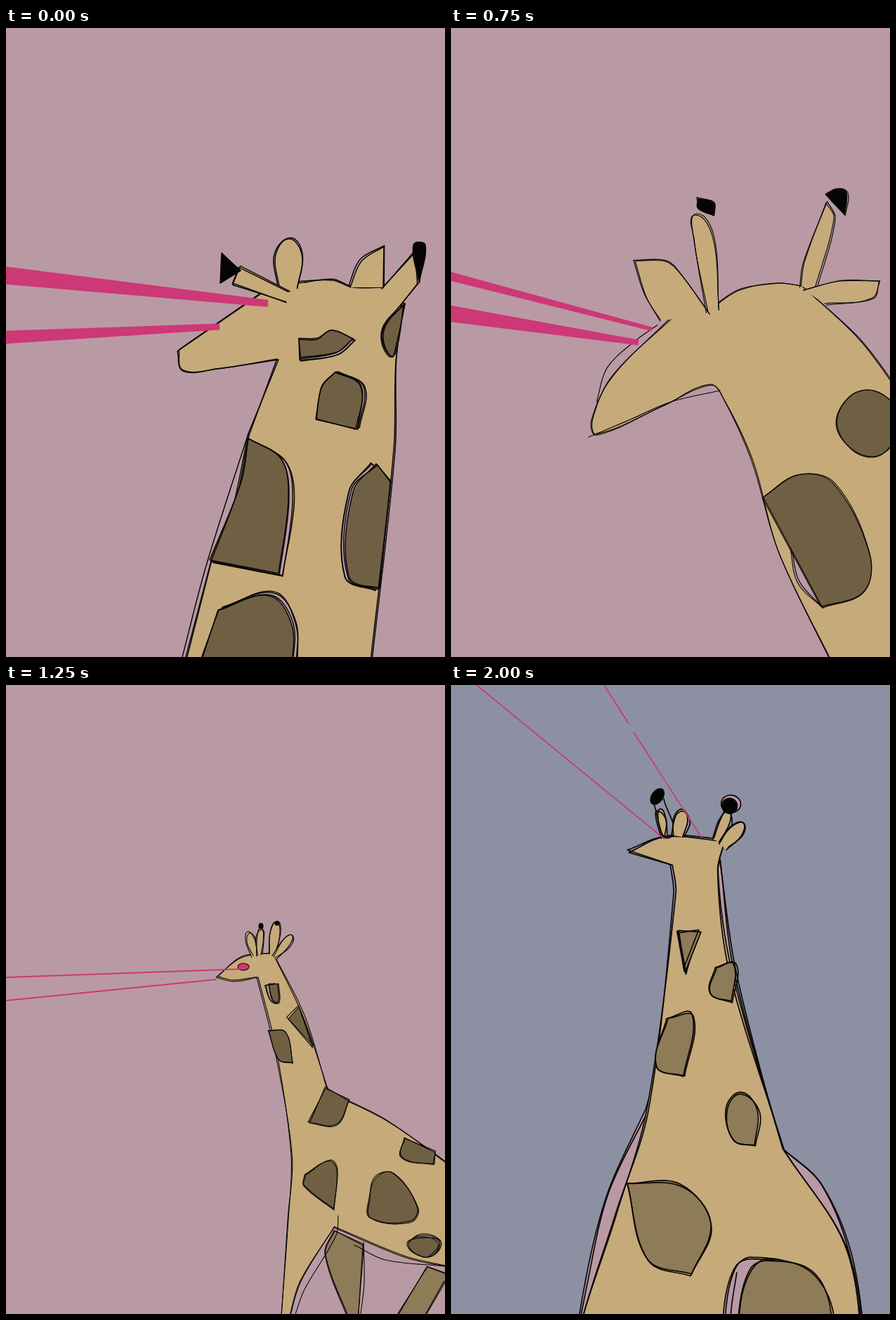
Recreate the animation shown at these times as an HTML page with a canvas. Size 625 px wide and 895 px high, loop 2250 ms.

```html
<!DOCTYPE html>
<html lang="en">
<head>
<meta charset="utf-8">
<title>Laser giraffe</title>
<style>
html, body { margin: 0; width: 100%; height: 100%; overflow: hidden; background: #b99aa4; }
canvas { display: block; }
</style>
</head>
<body>
<canvas id="stage" width="625" height="895"></canvas>
<script>
const ctx = document.getElementById('stage').getContext('2d');
const MAUVE = '#b99aa4', SLATE = '#8d90a3', TAN = '#c6aa7a', BROWN = '#706043',
      OLIVE = '#8e7b58', PINK = '#cd3877', BLACK = '#050505';

let seed;
const random = () => (seed = (seed * 16807) % 2147483647) / 2147483647;

// Smooth curve through "x,y" points; a trailing "!" makes a sharp corner.
function trace(text, closed, wobble = 0) {
  const pts = text.split(' ').flatMap(t => {
    const p = t.match(/-?[\d.]+/g).map(v => +v + (random() - 0.5) * wobble);
    return t.endsWith('!') ? [p, p] : [p];
  });
  const n = pts.length;
  const at = i => closed ? pts[(i + n) % n] : pts[Math.max(0, Math.min(n - 1, i))];
  const handle = (p, from, to, len) => {
    const dx = to[0] - from[0], dy = to[1] - from[1], k = len / (Math.hypot(dx, dy) || 1);
    return [p[0] + dx * k, p[1] + dy * k];
  };
  ctx.beginPath();
  ctx.moveTo(...pts[0]);
  for (let i = 0; i < (closed ? n : n - 1); i++) {
    const a = at(i - 1), b = at(i), c = at(i + 1), d = at(i + 2);
    const len = Math.hypot(c[0] - b[0], c[1] - b[1]) / 3;
    if (len) ctx.bezierCurveTo(...handle(b, a, c, len), ...handle(c, d, b, len), ...c);
  }
  if (closed) ctx.closePath();
}

function ink(path, closed, wobble) {
  trace(path, closed, wobble);
  ctx.stroke();
}

// A filled shape whose outline is gone over twice by hand.
function shape(color, path, closed) {
  trace(path, closed);
  ctx.fillStyle = color;
  ctx.fill();
  ctx.stroke();
  ink(path, closed, 5);
}

const skin = path => shape(TAN, path);
const tip = path => shape(BLACK, path, true);

// A spot; (dx, dy) is how far its bare outline slips out from under the colour.
const blotch = color => (path, dx = 0, dy = 0) => {
  ctx.save();
  ctx.translate(dx, dy);
  if (dx || dy) shape(MAUVE, path, true);
  ctx.restore();
  shape(color, path, true);
};
const spot = blotch(BROWN), patch = blotch(OLIVE);

// Returns at(t, side): the point a share t along a line, offset sideways.
function along(x1, y1, x2, y2) {
  const dx = x2 - x1, dy = y2 - y1, len = Math.hypot(dx, dy);
  return (t, side) => `${x1 + dx * t - dy / len * side},${y1 + dy * t + dx / len * side}`;
}

function horn(x1, y1, x2, y2, w1, w2 = w1) {
  const at = along(x1, y1, x2, y2);
  skin(`${at(0, -w1 / 2)}! ${at(1, -w2 / 2)}! ${at(1, w2 / 2)}! ${at(0, w1 / 2)}!`);
}

function ear(x1, y1, x2, y2, w) {
  const at = along(x1, y1, x2, y2);
  skin(`${at(0, -w / 3)}! ${at(0.65, -w / 2)} ${at(1, 0)} ${at(0.65, w / 2)} ${at(0, w / 3)}!`);
}

function beam(x1, y1, x2, y2, w1, w2) {
  const at = along(x1, y1, x2, y2);
  trace(`${at(0, -w1 / 2)}! ${at(1, -w2 / 2)}! ${at(1, w2 / 2)}! ${at(0, w1 / 2)}!`, true);
  ctx.fillStyle = PINK;
  ctx.fill();
}

function ray(width, path) {
  ctx.save();
  ctx.strokeStyle = PINK;
  ctx.lineWidth = width;
  ink(path);
  ctx.restore();
}

function oval(color, x, y, rx, ry, turn = 0) {
  ctx.beginPath();
  ctx.ellipse(x, y, rx, ry, turn, 0, Math.PI * 2);
  ctx.fillStyle = color;
  ctx.fill();
  ctx.stroke();
}

function profile() {
  ctx.lineWidth = 1.5;
  skin('254,910! 293,757! 318,702 345,577! 388,472! 300,485 252,488 244,460! 375,370! 422,360! 465,359 494,369 537,369! 567,392! 555,475 552,600 518,910!');
  ink('251,895 285,765 345,577');
  ear(402, 370, 403, 300, 38);
  skin('490,369! 506,332 538,311! 537,369!');
  skin('537,369! 582,317! 588,362! 557,400!');
  horn(401, 382, 328, 352, 16, 29);
  spot('417,443! 443,443 463,430 494,442! 470,462 418,471!', 2, 3);
  spot('470,489! 506,510 498,571! 441,556! 450,510', 3, 0);
  spot('345,584! 392,613 402,670 388,776! 290,757! 335,645', 6, 4);
  spot('527,620! 548,645! 530,799! 488,780 494,660', -6, 0);
  spot('275,910! 302,828! 375,808 407,850 407,910!', 6, -4);
  spot('566,393! 538,430 548,467 558,449', -3, 0);
  tip('307,320! 333,345! 305,363!');
  tip('580,309 597,309 588,362!');
  beam(373, 392, -20, 350, 10, 26);
  beam(304, 425, -20, 441, 9, 19);
}

function backView() {
  ctx.lineWidth = 1;
  skin('331,910! 323,760 331,520 329,382! 370,356 420,351 470,367 490,410 490,440! 535,540 573,690 591,910!');
  ink('490,440 550,575 578,740 591,850');
  skin('330,381! 254,413! 266,437 348,415!');
  skin('482,388! 538,357 525,400 490,441!');
  horn(337, 385, 277, 321, 18, 28);
  horn(455, 367, 499, 281, 24);
  oval(MAUVE, 429, 448, 36, 32);
  oval(BROWN, 432, 451, 32, 33);
  ink('421,435 425,460 435,482 460,458');
  oval(BROWN, 471, 559, 28, 46, -0.2);
  ink('442,560 463,527 480,553 498,585');
  ink('448,515 460,497 475,505');
  spot('330,538! 395,543 418,672! 331,703!', 2, -1);
  spot('557,612! 588,836! 513,800 482,710 484,665', -11, 0);
  spot('327,819! 365,814 405,835 437,910! 330,910!');
  oval(MAUVE, 275, 322, 5, 16);
  tip('262,310! 274,305 273,338 259,333');
  tip('488,269 503,262 513,284!');
  beam(327, 433, -60, 682, 8, 27);
  beam(330, 442, -20, 932, 7, 37);
}

function closeUp() {
  ctx.lineWidth = 1.2;
  skin('545,915! 460,740 420,605 378,512 360,492 290,522 190,566 182,545 213,480 305,387! 355,383! 400,352 460,341 495,345! 580,425 640,505! 640,915!');
  ink('190,517 205,467 245,428 280,403');
  ink('178,569 240,543 300,517 373,500');
  skin('356,385! 315,328 293,309 247,308! 263,360 284,397!');
  skin('355,383! 334,275 338,238 364,272 371,380!');
  skin('493,345! 498,310 530,222! 542,244 512,354!');
  skin('497,351! 550,338 609,338! 600,364 528,371!');
  spot('640,525! 600,500 565,509 545,550 570,588 607,597 640,570!');
  shape(MAUVE, '477,732! 488,785 525,822!');
  spot('437,658! 490,625 540,637 594,740 587,798 525,822!');
  tip('340,216! 364,221 364,241! 340,230');
  tip('529,209! 545,201 560,205 558,240!');
  beam(272, 409, -60, 322, 6, 14);
  beam(252, 429, -60, 381, 8, 26);
}

function sideView() {
  ctx.lineWidth = 1.1;
  patch('467,776! 508,797! 501,910! 490,910! 454,810');
  patch('600,828! 640,843! 625,850! 590,910! 548,910!');
  skin('391,910! 402,760 406,670 385,520 359,416! 325,422 299,416! 335,388 380,381! 425,470 458,578! 540,618 640,690! 640,830! 570,815 467,772! 418,850 401,910!');
  ink('412,895 425,860 470,783 473,755');
  ink('496,797 540,818 625,827');
  ink('509,793 510,850 505,895');
  ear(354, 386, 344, 351, 13);
  ear(360, 384, 363, 346, 9);
  ear(379, 383, 385, 337, 14);
  ear(382, 388, 407, 356, 12);
  spot('374,427! 388,425! 389,452 380,448', -4, 0);
  spot('402,475! 417,458! 438,514!');
  spot('374,492! 398,494 408,537! 388,533');
  spot('455,574! 489,590! 470,625 430,622!');
  spot('425,697! 460,677 471,690 467,747! 424,713');
  spot('517,730 527,701 550,694 587,745 575,765 518,758');
  spot('567,644! 611,665! 610,682! 564,672');
  spot('573,797 588,785 614,792 612,808 595,814', 2, -2);
  oval(BLACK, 363, 343, 3, 4);
  oval(BLACK, 386, 339, 3, 3);
  oval(PINK, 338, 401, 8, 5);
  ray(1.8, '0,416 340,404');
  ray(1.8, '0,449 299,419');
}

function lookingUp() {
  ctx.lineWidth = 1.1;
  shape(MAUVE, '257,910! 264,760 275,680 301,600! 343,365! 367,465 430,622! 470,652 505,720 530,830 534,910!');
  skin('264,910! 262,820 285,700 302,600 306,400 300,375! 259,368! 290,350 345,348! 342,375 365,465 430,622! 500,710 526,830 524,910!');
  ear(290, 349, 283, 325, 7);
  ink('276,320 295,350 285,315');
  ear(302, 348, 303, 323, 13);
  ear(337, 348, 346, 320, 10);
  ear(344, 353, 360, 329, 13);
  patch('312,434! 333,433! 323,470!', -1, 1);
  patch('351,464! 366,459 368,493! 348,488');
  patch('312,515! 335,511 333,566! 306,560');
  patch('374,592 386,575 403,590 404,622! 385,620');
  patch('292,670! 340,665 373,700 360,746! 318,737');
  patch('407,770 413,735 427,726 470,731 492,770 499,864! 412,864!', -14, 0);
  ink('401,740 400,780 410,870');
  oval(BLACK, 279, 314, 5, 8, 0.5);
  oval(MAUVE, 347, 313, 9, 8);
  oval(BLACK, 346, 315, 7, 7);
  ray(1.1, '-38,-98 245,250');
  ray(1.1, '251,258 323,346');
  ray(1.1, '-31,145 290,352');
}

// Moves the scene so that point (x, y) lands on (tx, ty), scaled and turned.
const view = (scene, x = 0, y = 0, tx = x, ty = y, zoom = 1, turn = 0) =>
  ({ scene, x, y, tx, ty, zoom, turn });
const views = [
  view(profile),
  view(backView, 470, 895, 470, 895, 1.118),
  view(backView),
  view(closeUp, 625, 895, 625, 895, 0.96),
  view(closeUp),
  view(sideView),
  view(lookingUp),
  view(lookingUp, 312, 314, 328, 240, 1.2, 5.5),
  view(lookingUp, 312, 314, 344.5, 164.5, 1.55, 6.5)
];

function render(now) {
  const v = views[Math.floor(now % 2250 / 250)];
  seed = 7;
  ctx.resetTransform();
  ctx.fillStyle = v.scene === lookingUp ? SLATE : MAUVE;
  ctx.fillRect(0, 0, 625, 895);
  ctx.translate(v.tx, v.ty);
  ctx.rotate(v.turn * Math.PI / 180);
  ctx.scale(v.zoom, v.zoom);
  ctx.translate(-v.x, -v.y);
  ctx.strokeStyle = '#0a0806';
  ctx.lineCap = ctx.lineJoin = 'round';
  v.scene();
}

const start = performance.now();
function tick() {
  render(performance.now() - start);
  requestAnimationFrame(tick);
}
tick();
</script>
</body>
</html>
```
